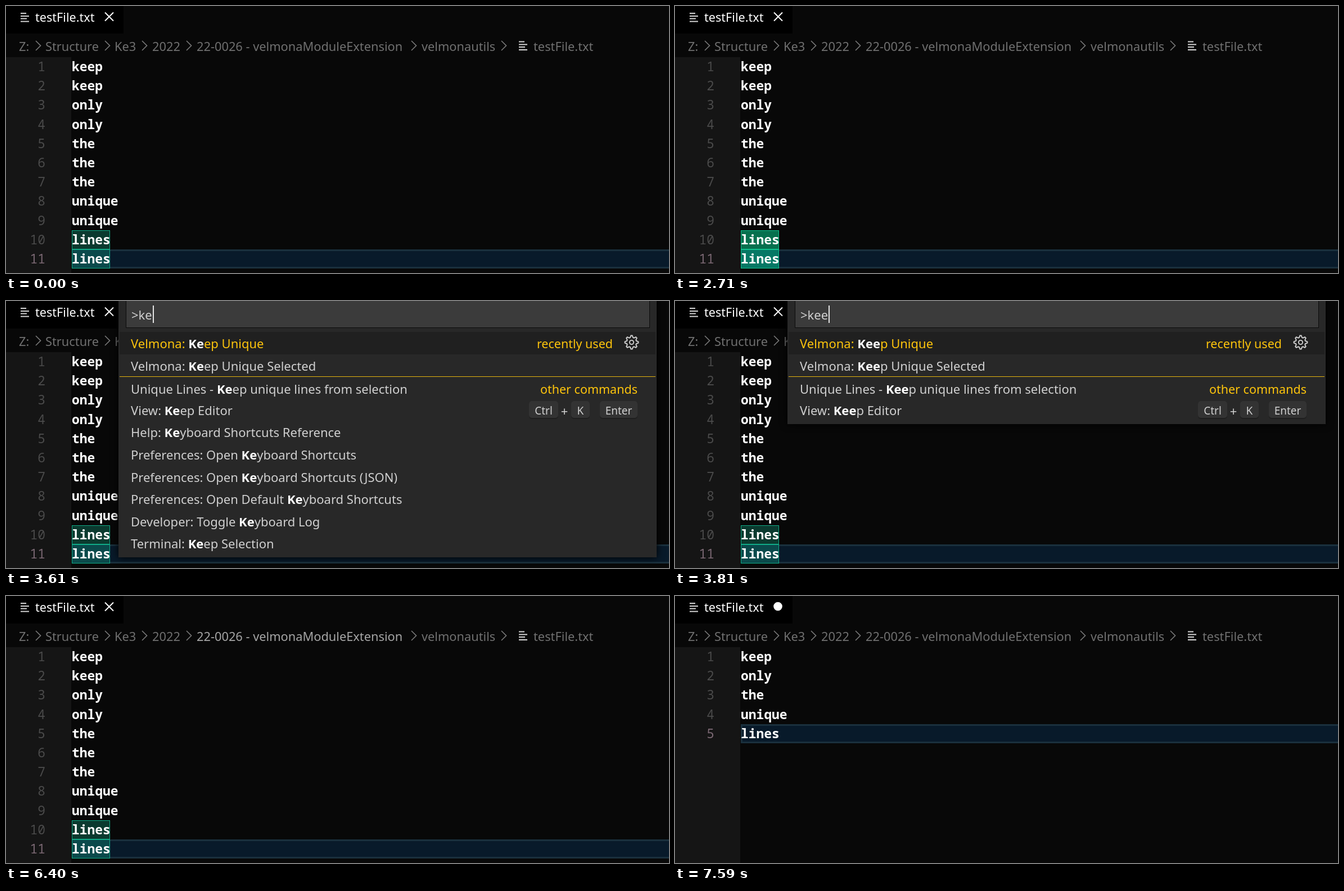
An HTML page that plays this animation: 1179x475 px, repeating every 9.97 s.

```html
<!DOCTYPE html>
<html lang="en">
<head>
<meta charset="utf-8">
<title>Keep unique lines</title>
<style>
  html, body { margin: 0; width: 100%; height: 100%; overflow: hidden; background: #080808; }
  svg { display: block; width: 1179px; height: 475px; }
  text { font: 22px "Noto Sans", "Open Sans", sans-serif; white-space: pre; fill: #d0d0d0; }
  .code { font: 600 22.9px "Noto Sans Mono", "DejaVu Sans Mono", monospace; fill: #fff; }
  .num { font-weight: 400; fill: #4a4a4a; }
  .num.now { font-weight: 500; fill: #7b6873; }
  .tab { font-size: 21.6px; fill: #fff; }
  .crumb { font-size: 21.8px; fill: #707070; }
  .crumb.hot { fill: #a6a6a6; }
  .chevron { fill: none; stroke: #777; stroke-width: 1.7; }
  .icon { stroke: #d4d4d4; stroke-width: 2; fill: none; }
  .yellow { fill: #fdc40c; }
  .hover { fill: #fff; }
  .match { font-weight: 700; fill: #fff; }
  .key { font-size: 19px; text-anchor: middle; }
  .plus { text-anchor: middle; }
  .end { text-anchor: end; }
  .note { font-size: 21.5px; }
  .tip { font-size: 17.2px; fill: #e6e6e6; }
  .panel { fill: #282828; filter: drop-shadow(0 0 7px #000); }
</style>
</head>
<body>
<svg id="stage" viewBox="0 0 1179 475"></svg>
<script>
const LOOP = 9970;
const ROW = 39.6;
const LINE = 34.2;
const stage = document.getElementById("stage");

const before = "keep keep only only the the the unique unique lines lines".split(" ");
const after = [...new Set(before)];
const project = "22-0026 - velmonaModuleExtension";
const tipText = ["Z:", "Structure", "Ke3", "2022", project].join("\\");

// Each key: label, left edge, width; a bare "+" only has its centre.
const terminalKeys = [["Ctrl", 936, 53], ["+", 1000], ["Shift", 1012, 61], ["+", 1084], ["`", 1096, 27]];
const editorKeys = [["Ctrl", 930, 52], ["+", 993], ["K", 1005, 33], ["Enter", 1056, 67]];

const recent = [
  "Velmona: Keep Unique",
  "Velmona: Keep Unique Selected",
  "Velmona: Strip empty lines from the document",
  "Velmona: Sort Selected Lines A-Z",
  "Velmona: Sort All Lines Alphabetically A-Z",
  "Velmona: Sort All Lines Alphabetically Z-A (Reversed)",
  "Velmona: Sort All Lines By Length Large to Small",
  "Terminal: Create New Terminal",
  "Trailing Spaces: Delete",
  "Velmona: Minify File"
];
const matching = [
  "Velmona: Keep Unique",
  "Velmona: Keep Unique Selected",
  "Unique Lines - Keep unique lines from selection",
  "View: Keep Editor"
];
const broad = [
  ...matching,
  "Help: Keyboard Shortcuts Reference",
  "Preferences: Open Keyboard Shortcuts",
  "Preferences: Open Keyboard Shortcuts (JSON)",
  "Preferences: Open Default Keyboard Shortcuts",
  "Developer: Toggle Keyboard Log",
  "Terminal: Keep Selection"
];
const shortcuts = {
  "Terminal: Create New Terminal": terminalKeys,
  "View: Keep Editor": editorKeys
};

// Changes of state over time; each one builds on those before it.
const steps = [
  [0, { lines: before, bright: false, caret: false, palette: null, typed: "", hover: -1, dirty: false, hot: false, tip: false }],
  [1260, { bright: true, caret: true }],
  [1720, { caret: false }],
  [2250, { caret: true }],
  [2710, { caret: false }],
  [2840, { bright: false, palette: recent, caret: true }],
  [3410, { caret: false }],
  [3540, { palette: broad, typed: "k", caret: true }],
  [3610, { typed: "ke" }],
  [3810, { palette: matching, typed: "kee" }],
  [3880, { typed: "keep" }],
  [4480, { caret: false }],
  [4940, { caret: true }],
  [5540, { caret: false }],
  [5670, { hover: 3 }],
  [5800, { hover: 2 }],
  [5870, { hover: 1 }],
  [5940, { hover: 0 }],
  [6070, { caret: true }],
  [6400, { palette: null, caret: false, hot: true }],
  [6530, { lines: after, dirty: true }],
  [7060, { tip: true }],
  [7590, { tip: false, hot: false }]
];

const rect = (x, y, w, h, fill, extra = "") =>
  `<rect x="${x}" y="${y}" width="${w}" height="${h}" fill="${fill}" ${extra}/>`;
const text = (x, y, cls, s) => `<text x="${x}" y="${y}" class="${cls}">${s}</text>`;
const path = (cls, d) => `<path class="${cls}" d="${d}"/>`;
const fileIcon = (x, y) => path("icon", `M${x} ${y}h10m-10 5h15m-15 4.5h11m-11 5h15`);
const chevron = x => path("chevron", `M${x - 4} 62l8.5 8.5l-8.5 8.5`);

function gear(cx, cy) {
  let d = "";
  for (let i = 0; i < 32; i++) {
    const a = (i - 0.5) / 32 * 2 * Math.PI;
    const r = i % 4 < 2 ? 12 : 8.8;
    d += `${i ? "L" : "M"}${(cx + r * Math.cos(a)).toFixed(2)} ${(cy + r * Math.sin(a)).toFixed(2)}`;
  }
  return `<g fill="none" stroke="#d0d0d0" stroke-width="1.9"><path d="${d}Z"/><circle cx="${cx}" cy="${cy}" r="3.6"/></g>`;
}

function header(s) {
  const crumbs = [[23, "Z:"], [70, "Structure"], [193, "Ke3"], [260, "2022"], [339, project], [739, "velmonautils"], [938, "testFile.txt"]];
  return rect(0, 0, 209, 49, "#000") + fileIcon(26, 13) + text(52, 28, "tab", "testFile.txt") +
    (s.dirty ? `<circle cx="183" cy="18.5" r="7.8" fill="#fff"/>`
             : `<path d="M176 11.5l15 15m0-15l-15 15" stroke="#fff" stroke-width="2"/>`) +
    crumbs.map(([x, name]) => text(x, 80, name === project && s.hot ? "crumb hot" : "crumb", name)).join("") +
    [57, 180, 246, 325, 725, 885].map(chevron).join("") + fileIcon(912, 63.5);
}

function editor(s) {
  const last = s.lines.length - 1;
  const top = Math.round(91.3 + last * LINE);
  let out = rect(0, 91, 116, 384, "#151515") +
    rect(118.5, top + 1.5, 1070, 31, "#081a2a", `stroke="#1a303d" stroke-width="3"`);
  if (!s.dirty) {
    const edge = `stroke="${s.bright ? "#10c48e" : "#10ac88"}"`;
    out += rect(117.5, 399.5, 67, 33, s.bright ? "#07704e" : "#0b3a2f", edge) +
      rect(117.5, 433.5, 67, 33, s.bright ? "#067865" : "#0a4a4b", edge);
  }
  s.lines.forEach((word, i) => {
    const y = (116 + i * LINE).toFixed(1);
    out += text(70, y, `code num end${i === last ? " now" : ""}`, i + 1) + text(117, y, "code", word);
  });
  if (s.caret && !s.palette) out += rect(186, 433, 2, 34, "#fff");
  return out;
}

function keycaps(keys, cy) {
  return keys.map(([label, x, w]) => {
    if (!w) return text(x, cy + 9, "plus", label);
    return rect(x, cy - 17, w, 32, "#1f1f1f", `rx="5"`) + rect(x, cy - 17, w, 30, "#333", `rx="5"`) +
      text(x + w / 2, cy + 7, "key", label);
  }).join("");
}

function mark(label, typed) {
  const at = typed ? label.search(new RegExp("\\bK" + typed.slice(1))) : -1;
  if (at < 0) return label;
  const end = at + typed.length;
  return `${label.slice(0, at)}<tspan class="match">${label.slice(at, end)}</tspan>${label.slice(end)}`;
}

function palette(s) {
  const split = s.palette !== recent;
  const bottom = s.palette.length > 4 ? 456 : 219;
  const caretX = [237, 249, 261, 273, 287][s.typed.length];
  let out = `<rect class="panel" x="200" y="-10" width="957" height="${bottom + 10}"/>` +
    rect(213.5, -5, 931, 52.5, "#3b3b3b", `stroke="#0b0b0b"`) +
    text(223, 33, "", "&gt;" + s.typed) +
    rect(202, 55, 953, 40, "#202020");
  if (s.caret) out += rect(caretX, 8, 2, 31, "#e4e4e4");

  s.palette.forEach((label, i) => {
    const lead = split && i === 2;
    const cy = 76 + i * ROW + (lead ? 2 : 0);
    const active = i === 0 || i === s.hover;
    const shift = active ? -44 : 0;
    const keys = shortcuts[label];
    out += text(222, (cy + 8).toFixed(1), i === 0 ? "yellow" : active ? "hover" : "", mark(label, s.typed));
    if (i === 0) out += text(1079, 84, "yellow note end", "recently used");
    if (lead) out += rect(202, 134, 953, 1, "#e4b30f") + text(1123 + shift, 165, "yellow note end", "other commands");
    if (keys) out += `<g transform="translate(${shift})">${keycaps(keys, Math.round(cy))}</g>`;
    if (active) out += gear(1112.5, cy - 2.5);
  });
  return out;
}

function tooltip() {
  return rect(676.5, 99.5, 492, 37, "#2b2b2b", `stroke="#686868"`) + text(686, 124, "tip", tipText);
}

let shown = 0;
function draw(now) {
  const t = now % LOOP;
  const passed = steps.filter(([at]) => at <= t);
  if (passed.length === shown) return;
  shown = passed.length;
  const s = Object.assign({}, ...passed.map(([, change]) => change));
  stage.innerHTML = rect(0, 0, 1179, 475, "#080808") + header(s) + editor(s) +
    (s.palette ? palette(s) : "") + (s.tip ? tooltip() : "");
}

const start = performance.now();
function tick() {
  draw(performance.now() - start);
  requestAnimationFrame(tick);
}
tick();
</script>
</body>
</html>
```
